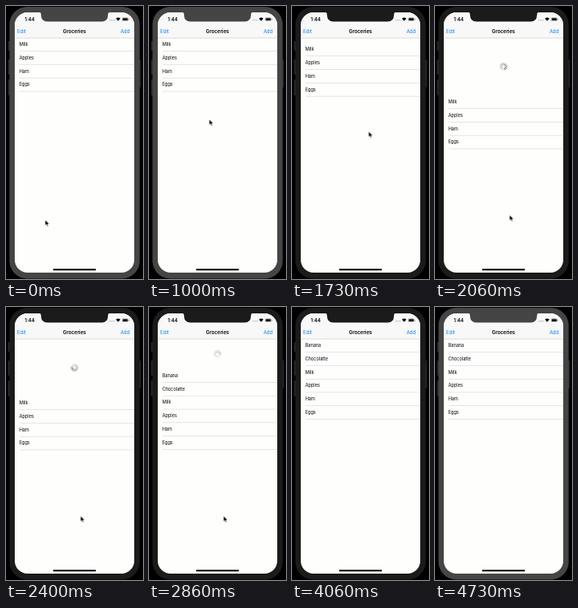
These frames come from a looping animation (172 by 342 pixels, 4.8 s). An HTML page:

```html
<!DOCTYPE html>
<html lang="en">
<head>
<meta charset="utf-8">
<title>Groceries</title>
<style>
html, body { margin: 0; width: 100%; height: 100%; overflow: hidden; background: #000; }
svg { display: block; width: 100vw; height: 100vh; }
text { font-family: Inter, Roboto, "Liberation Sans", sans-serif; }
.row { font-size: 5.55px; }
.bar { font-size: 6.15px; }
.bold { font-weight: 600; }
.link { fill: #0a84f5; }

#body, #list, #old, #new, #spin, #cursor { animation: 4.8s linear infinite; }
#body { animation-name: focus; }
#list { animation-name: pull; }
#old { animation-name: shift; }
#new { animation-name: reveal; }
#spin { animation-name: spin-pull; }
#cursor { animation-name: point; }
#wheel { animation: turn 1s steps(12) infinite; }

@keyframes focus {
  0% { fill: #454545; animation-timing-function: step-end; }
  29.17% { fill: #1b1b1b; animation-timing-function: step-end; }
  98.6%, 100% { fill: #454545; }
}
@keyframes pull {
  0%, 31.94% { transform: translateY(0); animation-timing-function: ease-in; }
  36.11% { transform: translateY(6px); animation-timing-function: cubic-bezier(.35, .25, .65, .95); }
  43.06%, 56.94% { transform: translateY(72px); animation-timing-function: cubic-bezier(.25, .5, .55, .95); }
  66.67% { transform: translateY(3.2px); animation-timing-function: ease-out; }
  72.22%, 100% { transform: translateY(0); }
}
@keyframes spin-pull {
  0%, 36.11% { transform: translateY(3px); opacity: 0; animation-timing-function: cubic-bezier(.35, .25, .65, .95); }
  43.06%, 56.94% { transform: translateY(36px); opacity: 1; animation-timing-function: cubic-bezier(.25, .5, .55, .95); }
  66.67%, 100% { transform: translateY(1.6px); opacity: 0; }
}
@keyframes shift {
  0% { transform: translateY(0); animation-timing-function: step-end; }
  58.33%, 100% { transform: translateY(33.6px); }
}
@keyframes reveal {
  0% { opacity: 0; animation-timing-function: step-end; }
  58.33%, 100% { opacity: 1; }
}
@keyframes point {
  0%, 9.72% { transform: translate(49.2px, 268px); animation-timing-function: ease-in-out; }
  20.83% { transform: translate(75.6px, 142px); animation-timing-function: ease-in-out; }
  29.17%, 31.94% { transform: translate(97px, 146px); animation-timing-function: ease-in; }
  36.11% { transform: translate(96.2px, 157px); animation-timing-function: cubic-bezier(.35, .25, .65, .95); }
  43.06%, 79.17% { transform: translate(93.6px, 261.8px); animation-timing-function: ease-in; }
  84.72%, 100% { transform: translate(80px, 346px); }
}
@keyframes turn { to { transform: rotate(360deg); } }
</style>
</head>
<body>
<svg viewBox="0 0 172 342" preserveAspectRatio="none">
  <defs>
    <clipPath id="glass"><rect x="11" y="8" width="150" height="326" rx="16"/></clipPath>
    <clipPath id="below"><rect x="11" y="40.3" width="150" height="294"/></clipPath>
  </defs>

  <g fill="#292929">
    <rect x="2.6" y="44" width="4" height="12" rx="1"/>
    <rect x="2.6" y="67" width="4" height="19" rx="1"/>
    <rect x="2.6" y="92" width="4" height="20" rx="1"/>
    <rect x="165" y="67" width="4.2" height="35" rx="1"/>
  </g>
  <g id="body">
    <rect x="4.4" y="1" width="163.4" height="340.4" rx="22"/>
    <g clip-path="url(#glass)">
      <rect x="11" y="8" width="150" height="326" fill="#fefefd"/>
      <g clip-path="url(#below)">
        <g id="list">
          <g id="old"></g>
          <g id="new"></g>
        </g>
        <g id="spin"><g transform="translate(86 40)"><g id="wheel"></g></g></g>
      </g>
      <rect x="11" y="8" width="150" height="32" fill="#f8f8f8"/>
      <rect x="11" y="39.8" width="150" height=".5" fill="#bbb"/>
    </g>
    <path d="M41 7.5Q44 7.8 44 11Q44 19.5 52 19.5H120Q128 19.5 128 11Q128 7.8 131 7.5Z"/>
  </g>

  <text class="bold" x="23.6" y="19" font-size="6">1:44</text>
  <g fill="#777">
    <circle cx="130.6" cy="17.8" r=".5"/><circle cx="132.4" cy="17.8" r=".5"/>
    <circle cx="134.2" cy="17.8" r=".5"/><circle cx="136" cy="17.8" r=".5"/>
  </g>
  <path d="M138 15.8Q140.8 13.4 143.6 15.8L140.8 18.8Z"/>
  <rect x="146" y="14.7" width="7.3" height="3.9" rx="1" fill="#fff" stroke="#555" stroke-width=".4"/>
  <rect x="146.6" y="15.3" width="6.1" height="2.7" rx=".5"/>
  <rect x="153.9" y="16" width=".6" height="1.3" fill="#555"/>

  <text class="bar link" x="14" y="34.1">Edit</text>
  <text class="bar bold" x="86" y="34.1" text-anchor="middle">Groceries</text>
  <text class="bar link" x="155.4" y="34.1" text-anchor="end">Add</text>
  <rect x="59" y="329.2" width="54" height="2" rx="1"/>

  <path id="cursor" d="M0 0V6.8L1.6 5.5 2.7 8 3.9 7.5 2.9 5.1H5Z" stroke="#fff" stroke-width=".5"/>
</svg>
<script>
const LOOP = 4800, STEP = 1000 / 15, PITCH = 16.8;

const rows = names => names.map((name, i) => {
  const y = i * PITCH;
  return `<text class="row" fill="#000" x="16.7" y="${50 + y}">${name}</text>` +
    `<rect x="17" y="${56.3 + y}" width="144" height=".5" fill="#ccc"/>`;
}).join("");

const fill = (id, html) => { document.getElementById(id).innerHTML = html; };
fill("old", rows(["Milk", "Apples", "Ham", "Eggs"]));
fill("new", rows(["Banana", "Chocolatte"]));
fill("wheel", Array.from({ length: 12 }, (_, i) =>
  `<path d="M0-2.3V-4.6" stroke="#555" stroke-width=".85" stroke-linecap="round"
    opacity="${1 - 0.065 * i}" transform="rotate(${150 - 30 * i})"/>`).join(""));

// Advance every animation on one 15 fps clock.
const clips = document.getAnimations();
clips.forEach(clip => clip.pause());
const start = performance.now();

function tick() {
  const t = Math.max(0, performance.now() - start) % LOOP;
  const step = Math.min(71, Math.floor((t + 7) / STEP));
  clips.forEach(clip => { clip.currentTime = step * STEP + 1; });
  requestAnimationFrame(tick);
}
tick();
</script>
</body>
</html>
```
